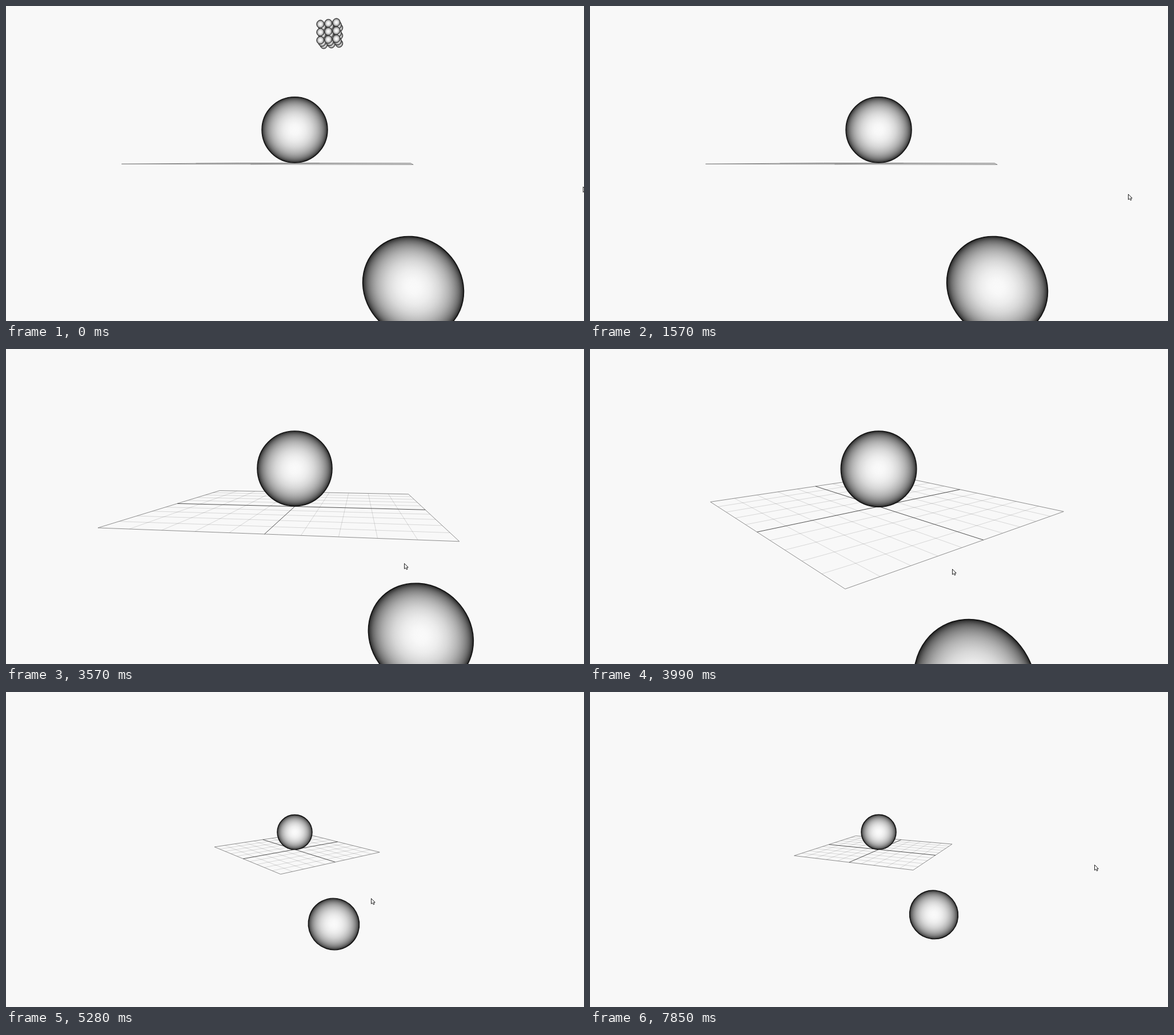
These frames come from a looping animation (1012x553 px, 7.99 s). An HTML page with a canvas:

```html
<!DOCTYPE html>
<html lang="en">
<head>
<meta charset="utf-8">
<title>Falling block</title>
<style>
  html, body { margin: 0; width: 100%; height: 100%; overflow: hidden; background: #f8f8f8; }
  canvas { display: block; width: 1012px; height: 553px; }
</style>
</head>
<body>
<canvas id="stage" width="1012" height="553"></canvas>
<script>
const ctx = document.getElementById('stage').getContext('2d');
const LOOP = 7990, STEP = LOOP / 56;
const CX = 505.5, CY = 276.5, FOCAL = 667;
const RAD = Math.PI / 180;

// Share of the span from a to b (ms) that has passed.
const ramp = (t, a, b) => Math.min(1, Math.max(0, (t - a) / (b - a)));

// The pointer enters, drags right then left, turns the view again, and leaves.
function gestures(t) {
  const enter = ramp(t, 1280, 2280), right = ramp(t, 2850, 3420);
  const left = ramp(t, 3420, 3990), tilt = ramp(t, 3000, 3990);
  const back = ramp(t, 3990, 4850), turn = ramp(t, 5710, 6070);
  const nudge = ramp(t, 5710, 5990), leave = ramp(t, 5990, 6700);
  return {
    cursor: [
      1010 - 234 * enter - 57 * right - 85 * left + 5 * back + 16 * nudge
        + 355 * leave - 127 * ramp(t, 7130, 7850),
      317 + 46 * enter + 23 * tilt - 24 * back - 26 * nudge - 33 * leave
    ],
    azimuth: 73.5 + 21.5 * ramp(t, 3000, 3420) - 56 * left - 1.7 * back + 27 * turn,
    elevation: 0.3 + 14.75 * tilt - 1.35 * back - 1.6 * ramp(t, 5710, 6200),
    distance: 3.41 * 0.8915 ** ramp(t, 2800, 3140) * 2.128 ** ramp(t, 4510, 5080)
  };
}

// World units: half the grid is 1, z points up.
function makeCamera({ azimuth, elevation, distance }) {
  const sa = Math.sin(azimuth * RAD), ca = Math.cos(azimuth * RAD);
  const se = Math.sin(elevation * RAD), ce = Math.cos(elevation * RAD);
  const view = (x, y, z) => {
    const right = x * sa + y * ca, near = x * ca - y * sa;
    return [right, near * se - z * ce, distance - near * ce - z * se];
  };
  const project = (x, y, z) => {
    const [u, v, d] = view(x, y, z);
    return [CX + FOCAL * u / d, CY + FOCAL * v / d];
  };
  return { elevation, view, project };
}

const shading = ctx.createRadialGradient(0, 0, 0, 0, 0, 1);
for (let i = 0; i <= 24; i++) {
  const r = Math.sin(i / 24 * Math.PI / 2);
  const tone = Math.round(Math.max(30, 250 * Math.sqrt(1 - r * r)));
  shading.addColorStop(r, `rgb(${tone},${tone},${tone})`);
}

// Perspective outline of a sphere: an ellipse stretched away from the view axis.
function drawSphere([u, v, d], radius, outline = '#111', width = 1.4) {
  const side = Math.hypot(u, v), angle = Math.atan2(v, u);
  const off = Math.atan2(side, d);
  const spread = Math.asin(radius / Math.hypot(side, d));
  const inner = FOCAL * Math.tan(off - spread), outer = FOCAL * Math.tan(off + spread);
  const middle = (inner + outer) / 2;
  ctx.save();
  ctx.translate(CX + middle * Math.cos(angle), CY + middle * Math.sin(angle));
  ctx.rotate(angle);
  ctx.scale((outer - inner) / 2, FOCAL * radius / Math.sqrt(d * d - radius * radius));
  ctx.beginPath();
  ctx.arc(0, 0, 1, 0, 7);
  ctx.fillStyle = shading;
  ctx.fill();
  ctx.restore();
  ctx.lineWidth = width;
  ctx.strokeStyle = outline;
  ctx.stroke();
}

function drawGrid(camera) {
  const line = (a, b, color) => {
    ctx.strokeStyle = color;
    ctx.beginPath();
    ctx.moveTo(...camera.project(...a, 0));
    ctx.lineTo(...camera.project(...b, 0));
    ctx.stroke();
  };
  const both = (p, color) => {
    line([p, -1], [p, 1], color);
    line([-1, p], [1, p], color);
  };
  ctx.lineWidth = 0.9;
  const faint = `rgba(0,0,0,${0.15 * Math.min(1, camera.elevation / 8)})`;
  for (let i = 1; i < 5; i++) {
    both(i / 5, faint);
    both(-i / 5, faint);
  }
  both(1, '#808080');
  both(-1, '#808080');
  both(0, camera.elevation < 1 ? '#888' : '#3c3c3c');
}

// Free fall, then a bounce off each large sphere (seconds, units, degrees).
const GRAVITY = 2.5;
const fly = (s, { x, z, vx, vz, roll, spin }) => ({
  x: x + vx * s, z: z + vz * s - GRAVITY * s * s / 2, roll: roll + spin * s
});
function blockAt(s) {
  const hit = 0.413, secondHit = 1.03;
  const drop = { x: 0.319, z: 1.13, vx: 0, vz: -0.75, roll: 0, spin: 0 };
  if (s < hit) return fly(s, drop);
  const bounce = { ...fly(hit, drop), vx: 0.49, vz: -1.31, spin: 160 };
  if (s < secondHit) return fly(s - hit, bounce);
  const last = { ...fly(secondHit - hit, bounce), vx: -0.3, vz: -2, spin: -150 };
  return fly(s - secondHit, last);
}

function drawBlock(camera, { x, z, roll }) {
  const gap = 0.069, c = gap * Math.cos(roll * RAD), s = gap * Math.sin(roll * RAD);
  const balls = [], side = [-1, 0, 1];
  for (const i of side) for (const j of side) for (const k of side)
    balls.push(camera.view(x + i * c + k * s, j * gap, z + k * c - i * s));
  balls.sort((a, b) => b[2] - a[2]);
  for (const ball of balls) drawSphere(ball, 0.0325, '#333', 1);
}

const arrow = new Path2D('M.5 .5V10L2.7 8L4.3 11.2L6 10.4L4.5 7.3H7.2Z');
function drawCursor([x, y]) {
  ctx.save();
  ctx.translate(Math.round(x), Math.round(y));
  ctx.lineWidth = 1;
  ctx.fillStyle = '#fff';
  ctx.strokeStyle = '#222';
  ctx.fill(arrow);
  ctx.stroke(arrow);
  ctx.restore();
}

function draw(now) {
  const t = Math.floor((now % LOOP + 5) / STEP) % 56 * STEP;
  const pose = gestures(t);
  const camera = makeCamera(pose);
  ctx.fillStyle = '#f8f8f8';
  ctx.fillRect(0, 0, 1012, 553);
  drawSphere(camera.view(1, 0, -1), 0.394);
  drawGrid(camera);
  drawSphere(camera.view(0, 0, 0.3), 0.293);
  if (t < 1500) drawBlock(camera, blockAt(t / 1000));
  drawCursor(pose.cursor);
}

const start = performance.now();
function tick() {
  draw(performance.now() - start);
  requestAnimationFrame(tick);
}
tick();
</script>
</body>
</html>
```
